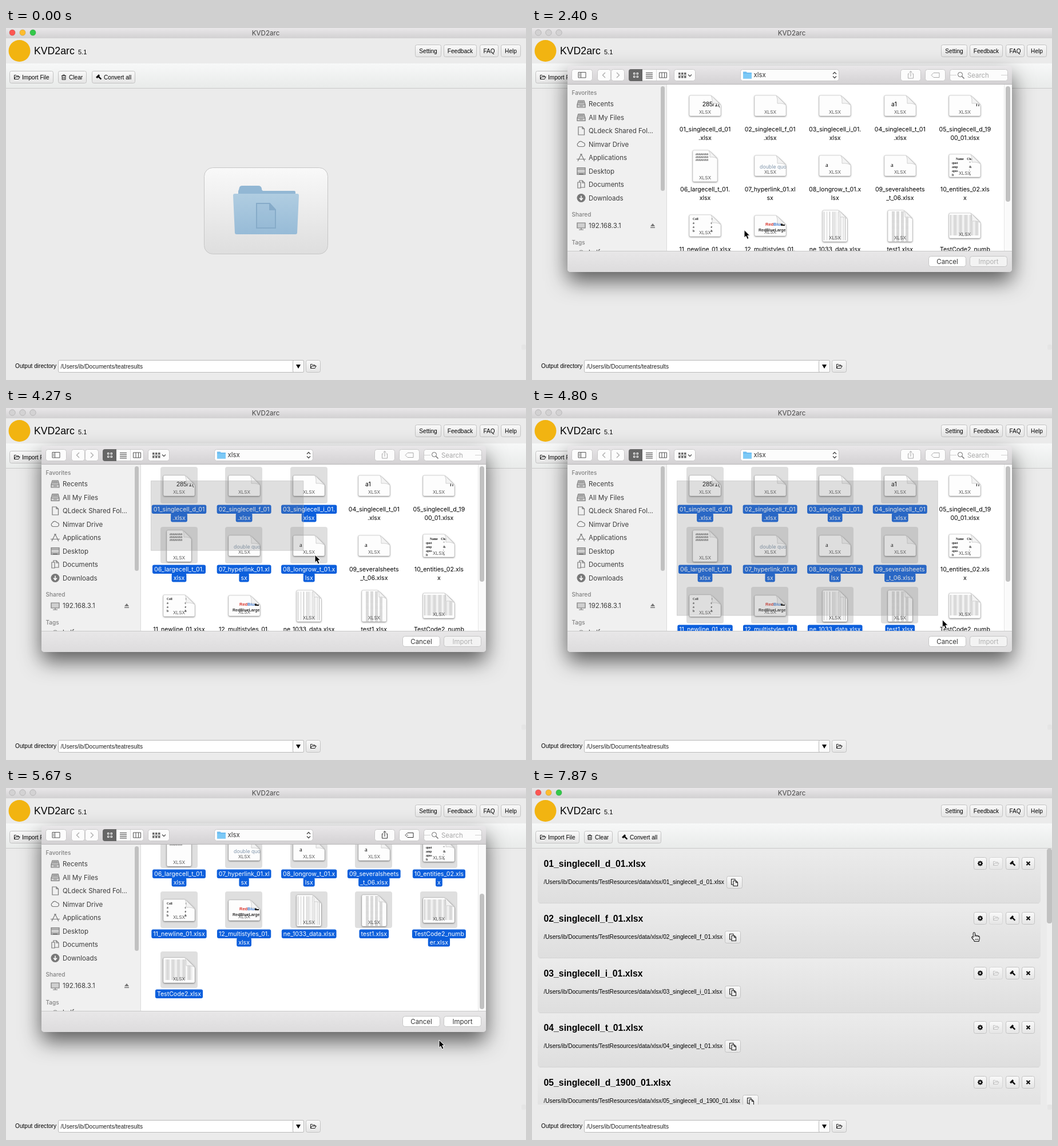
Recreate the animation shown at these times as an HTML page with a canvas. Size 909 by 616 pixels, loop 8000 ms.

```html
<!DOCTYPE html>
<html lang="en">
<head>
<meta charset="utf-8">
<title>KVD2arc</title>
<style>
html, body { margin: 0; width: 100%; height: 100%; overflow: hidden; background: #ebebeb; }
canvas { display: block; }
</style>
</head>
<body>
<canvas id="stage" width="909" height="616"></canvas>
<script>
const c = document.getElementById('stage').getContext('2d');
const HELV = '"Liberation Sans", sans-serif', UI = 'Inter, sans-serif', SERIF = '"Liberation Serif", serif';
const APP = 'KVD2arc', HOME = '/Users/ib/Documents/';

// ---- drawing helpers ----
function text(s, x, cy, size, color = '#000', align = 'left', family = HELV, weight = '') {
  c.font = `${weight} ${size}px ${family}`;
  c.fillStyle = color;
  c.textAlign = align;
  c.fillText(s, x, cy + size * .36);
}
const ui = (s, x, cy, size, color, align, weight) => text(s, x, cy, size, color, align, UI, weight);
function fade(y0, y1, a, b) {
  const g = c.createLinearGradient(0, y0, 0, y1);
  g.addColorStop(0, a);
  g.addColorStop(1, b);
  return g;
}
function box(x, y, w, h, r, fill, stroke) {
  const o = stroke ? .5 : 0;
  c.beginPath();
  c.roundRect(x + o, y + o, w - 2 * o, h - 2 * o, r);
  if (fill) { c.fillStyle = fill; c.fill(); }
  if (stroke) { c.strokeStyle = stroke; c.lineWidth = 1; c.stroke(); }
}
function rect(x, y, w, h, fill) { c.fillStyle = fill; c.fillRect(x, y, w, h); }
function disc(x, y, r, fill, stroke) {
  c.beginPath();
  c.arc(x, y, r, 0, 7);
  if (fill) { c.fillStyle = fill; c.fill(); }
  if (stroke) { c.strokeStyle = stroke; c.lineWidth = 1; c.stroke(); }
}
function shape(d, x, y, fill, stroke, width = 1) {
  const p = new Path2D(d);
  c.save();
  c.translate(x, y);
  c.lineWidth = width;
  if (fill) { c.fillStyle = fill; c.fill(p); }
  if (stroke) { c.strokeStyle = stroke; c.stroke(p); }
  c.restore();
}
function clipped(x, y, w, h, draw) {
  c.save();
  c.beginPath();
  c.rect(x, y, w, h);
  c.clip();
  draw();
  c.restore();
}

// ---- icons, centred on x, y ----
const folderIcon = (x, y, col = '#222') =>
  shape('M-4.5 3.5V-3.5H-1.5L-.5-2.2H3V-.5M-4.5 3.5L-2.5-.5H5.2L3 3.5Z', x, y, null, col);
function trashIcon(x, y) {
  shape('M-4-2.5H4M-1.5-2.5V-4H1.5V-2.5M-3-2.5V4.3H3V-2.5M-1.2-.5V3M1.2-.5V3', x, y, null, '#222');
}
const hammerIcon = (x, y) =>
  shape('M-5 0L0-5L2.2-2.8L1-1.4L5.2 2.8L3.6 4.6L-.8 .4L-2.6 2.2Z', x, y, '#111');
function gearIcon(x, y) {
  for (let i = 0; i < 4; i++) {
    c.save(); c.translate(x, y); c.rotate(i * Math.PI / 4);
    rect(-1, -4.5, 2, 9, '#111');
    c.restore();
  }
  disc(x, y, 3.4, '#111');
  disc(x, y, 1.4, '#f0f0f0');
}
const crossIcon = (x, y) => shape('M-3-3L3 3M3-3L-3 3', x, y, null, '#111', 2.2);
const copyIcon = (x, y) =>
  shape('M-2-3H3L5.5-.5V6H-2ZM2.5-3V0H5.5M-2 3.5H-5.5V-6H1V-3', x, y, null, '#222', 1.1);

// ---- main window ----
function button(x, y, w, h = 22, border = '#c2c2c2') { box(x, y, w, h, 3, fade(y, y + h, '#fafafa', '#e4e4e4'), border); }

function mainWindow(active, hover) {
  rect(0, 0, 909, 616, '#ebebeb');
  rect(0, 0, 909, 18, fade(0, 18, '#e9e7e9', '#d2d1d2'));
  ['#fc5753', '#fdbc2f', '#34c84a'].forEach((col, i) =>
    disc(11 + 18 * i, 8, 5.2, active ? col : '#d3d2d3', active ? 'rgba(0,0,0,.12)' : '#b9b8b9'));
  ui(APP, 454, 8.5, 11.6, '#454545', 'center');
  disc(23.5, 40, 19, '#f2b411');
  text(APP, 49, 40, 17.7);
  text('5.1', 126, 42, 11);
  for (const [label, x, w] of [['Setting', 715, 46], ['Feedback', 765, 58], ['FAQ', 828, 33], ['Help', 865, 35]]) {
    button(x, 29, w);
    text(label, x + w / 2, 40, 10.1, '#000', 'center');
  }
  rect(0, 62, 909, 43, fade(62, 105, '#f7f8f8', '#e9ebea'));
  rect(0, 105, 909, 1, '#c9c9c9');
  for (const [label, x, w, tx, icon] of [['Import File', 6, 77, 28, folderIcon], ['Clear', 91, 50, 110, trashIcon], ['Convert all', 150, 76, 171, hammerIcon]]) {
    button(x, 75, w);
    icon(tx - 9, 86);
    text(label, tx, 86, 10.1);
  }
  text('Output directory', 16, 591, 10.15);
  box(91, 581, 430, 22, 2, '#fff', '#b9b9b9');
  text(HOME + 'teatresults', 95.5, 592, 10.15, '#222');
  box(501, 581, 20, 22, 2, '#fafafa', '#b9b9b9');
  shape('M-4-3H4L0 4Z', 511, 592, '#000');
  button(524, 581, 26);
  folderIcon(537, 592);
  box(901, 554, 8, 9, 2, '#e5e5e5');
}

function dropZone(hover) {
  box(346, 244, 217, 152, 15, fade(244, 396, '#f9f9f9', '#dedede'), hover ? '#a9a9a9' : '#c6c6c6');
  shape('M406 292V285Q407 284 408 279Q409 276 413 276H441Q446 276 447 281Q447 285 450 285H504Q506 285 506 288V292Z', 0, 0, '#92b7d4');
  shape('M397 293Q397 290 400 290H509Q512 290 512 293L509 358Q509 361 506 361H403Q400 361 400 358Z', 0, 0, fade(290, 361, '#b0cde1', '#97bbd7'));
  shape('M438 307H461L471 318V350H438ZM461 307V318H471', 0, 0, 'rgba(120,165,200,.14)', '#86abc9', 2);
  shape('M461 307L471 318H461Z', 0, 0, '#86abc9');
}

function fileList() {
  clipped(0, 106, 909, 448, () => {
    ['01_singlecell_d_01', '02_singlecell_f_01', '03_singlecell_i_01', '04_singlecell_t_01', '05_singlecell_d_1900_01'].forEach((name, i) => {
      const y = Math.round(110 + i * 95.8);
      box(10, y, 879, 92, 5, fade(y, y + 92, '#ebebeb', '#dedede'));
      rect(13, y + 91, 873, 1, '#d3d3d3');
      text(name + '.xlsx', 20.5, y + 22, 15.8, '#000', 'left', HELV, 'bold');
      const path = HOME + `TestResources/data/xlsx/${name}.xlsx`;
      text(path, 20.5, y + 54, 10.1);
      const bx = Math.round(25 + c.measureText(path).width);
      button(bx, y + 44, 28);
      copyIcon(bx + 14, y + 55.5);
      [[772, 23, gearIcon], [799, 24], [828, 24, hammerIcon], [856, 23, crossIcon]].forEach(([x, w, icon]) => {
        button(x, y + 11, w, 22, icon ? '#c2c2c2' : '#d6d6d6');
        (icon || ((a, b) => folderIcon(a, b, '#c4c4c4')))(x + w / 2, y + 22);
      });
    });
    rect(900, 106, 9, 448, '#f0f0f0');
    box(900, 106, 9, 131, 4, '#c1c1c1');
  });
}

// ---- open panel ----
function hatch(x, y, w, h, step, seed) {
  for (let i = 0; i < w; i += step) {
    const k = Math.abs(Math.sin(i * 12.9 + seed)) * 90 | 0;
    rect(x + i, y, 1, h, `rgba(60,60,60,${(k + 10) / 260})`);
  }
}
const cells = (x, y, rows, cols, s) => {
  for (let r = 0; r < rows; r++) for (let k = 0; k < cols; k++) text(s[(r * cols + k) % s.length], x + k * 30, y + r * 7, 5.5, '#222', 'left', SERIF, 'bold');
};
// Each file: two label lines, page height, thumbnail painter relative to the page's left and centre.
const files = [
  ['01_singlecell_d_01', '.xlsx', 36, (x, y) => text('285/1(', x + 23, y - 3, 10.8)],
  ['02_singlecell_f_01', '.xlsx', 36],
  ['03_singlecell_i_01.', 'xlsx', 36],
  ['04_singlecell_t_01', '.xlsx', 36, (x, y) => ui('a1', x + 12, y - 3, 10.5)],
  ['05_singlecell_d_19', '00_01.xlsx', 36, (x, y) => text('h', x + 47, y - 3, 11)],
  ['06_largecell_t_01.', 'xlsx', 55, (x, y) => { for (let i = 0; i < 3; i++) text('########', x + 5, y - 20 + i * 5, 5, '#111'); }],
  ['07_hyperlink_01.xl', 'sx', 36, (x, y) => ui('double quot', x + 9, y + 2, 8.8, '#8196ab')],
  ['08_longrow_t_01.x', 'lsx', 36, (x, y) => text('a', x + 11, y - 2, 10.5, '#000', 'left', SERIF)],
  ['09_severalsheets', '_t_06.xlsx', 36, (x, y) => text('a', x + 11, y - 2, 10.5, '#000', 'left', SERIF)],
  ['10_entities_02.xls', 'x', 40, (x, y) => {
    text('Name    Cha', x + 12, y - 12, 5.5, '#111', 'left', SERIF, 'bold');
    cells(x + 5, y - 5, 4, 2, ['quot', '"', 'amp', '&', 'apos', "'", 'lt', '<']);
  }],
  ['11_newline_01.xlsx', '', 38, (x, y) => cells(x + 6, y - 12, 4, 2, ['Coll', '  C', 'a', ' c', 'a', ' e', 'b', ' h'])],
  ['12_multistyles_01.', 'xlsx', 36, (x, y) => {
    text('Red', x + 19, y - 3, 7.5, '#d8342c', 'left', HELV, 'bold');
    text('Blue', x + 33, y - 3, 7.5, '#3c76c8', 'left', HELV, 'bold');
    text('RedBlueLargeSr', x + 7, y + 7, 7, '#333', 'left', HELV, 'bold');
    rect(x + 46, y - 6, 3, 6, '#111');
    rect(x + 46, y - 2, 7, 2, '#111');
  }],
  ['ne_1033_data.xlsx', '', 55, (x, y) => { hatch(x + 2, y - 25, 16, 50, 5, 1); hatch(x + 18, y - 25, 22, 50, 3, 4); }],
  ['test1.xlsx', '', 55, (x, y) => {
    for (let r = 0; r < 24; r++) for (let k = 0; k < 4; k++) rect(x + 7 + k * 8, y - 25 + r * 2.2, 5, 1, '#b0b0b0');
  }],
  ['TestCode2_numb', 'er.xlsx', 44, (x, y) => hatch(x + 2, y - 19, 50, 36, 2, 2)],
  ['TestCode2.xlsx', '', 44, (x, y) => hatch(x + 2, y - 19, 50, 36, 2, 3)]
];

function page(x, y, w, h, paint) {
  const f = w > 50 ? 15 : 13;
  const d = `M0 2Q0 0 2 0H${w - f - 3}Q${w - f} 1 ${w - 3} ${f - 2}Q${w} ${f} ${w} ${f + 3}V${h - 2}Q${w} ${h} ${w - 2} ${h}H2Q0 ${h} 0 ${h - 2}Z`;
  c.save();
  c.shadowColor = 'rgba(0,0,0,.45)';
  c.shadowBlur = 3;
  c.shadowOffsetY = 1;
  shape(d, x, y, '#fdfdfd');
  c.restore();
  c.save();
  c.translate(x, y);
  c.clip(new Path2D(d));
  c.translate(-x, -y);
  if (paint) paint(x, y + h / 2);
  c.restore();
  shape(d, x, y, null, 'rgba(0,0,0,.13)');
  shape(`M${w - f - 2} 0Q${w - f + 1} 5 ${w - f} ${f - 1}Q${w - 5} ${f - 2} ${w} ${f + 2}Z`, x, y, '#f3f3f3', '#d0d0d0');
  ui('XLSX', x + w / 2, y + h - 6.5, 8.2, '#555', 'center');
}

function fileItem([line1, line2, h, paint], i, scroll, selected) {
  const cx = 302.5 + (i % 5) * 113.6, top = (i / 5 | 0) * 105 - scroll, w = h > 50 ? 43 : 55;
  if (selected) box(Math.round(cx) - 33, 103 + top, 65, 64, 4, '#dfdfdf');
  page(Math.round(cx - w / 2), Math.round(136 + top - h / 2), w, h, paint);
  [line1, line2].forEach((s, k) => {
    if (!s) return;
    const y = 177.5 + top + k * 14.5;
    c.font = '10.6px ' + UI;
    if (selected) {
      const tw = c.measureText(s).width + 6;
      box(cx - tw / 2, y - 8, tw, 15.5, 3, '#0c5fdc');
    }
    ui(s, cx, y, 10.6, selected ? '#fff' : '#000', 'center');
  });
}

const sideIcons = {
  tray: 'M-5-6H5L7 1V6H-7V1ZM-7 1H7M-4-4H4M-5-2H5M-3 3.5H3',
  page: 'M-5-7H2L5.5-3.5V7H-5ZM2-7V-3.5H5.5',
  cloud: 'M-4 4A3.5 3.5 0 0 1-5-2.5A4.5 4.5 0 0 1 3-3A3.6 3.6 0 0 1 4 4Z',
  apps: 'M-6 6L0-6L6 6M-8 2.5H8M-2-6H2',
  desk: 'M-7-6H7V6H-7ZM-7-3.5H7M-7 3.5H7M-4 5H4',
  docs: 'M-6-4H-1V6H-6ZM-3-4V-7H2L6-3V5H-1M2-7V-3H6',
  screen: 'M-7-6H7V3H-7ZM0 3V6M-4 6H4'
};
function sidebar() {
  rect(62, 99, 174, 291, '#f0f0f0');
  for (const [s, y] of [['Favorites', 113], ['Shared', 326], ['Tags', 375]]) ui(s, 69.5, y, 10, '#808080', 'left', 500);
  [['tray', 'Recents'], ['tray', 'All My Files'], ['page', 'QLdeck Shared Fol...'], ['cloud', 'Nimvar Drive'], ['apps', 'Applications'],
   ['desk', 'Desktop'], ['docs', 'Documents'], ['', 'Downloads']].forEach(([icon, s], i) => {
    const y = 133 + i * 23.5;
    if (icon) shape(sideIcons[icon], 86, y, icon === 'tray' || icon === 'desk' ? '#cfcfcf' : null, '#777', 1.2);
    ui(s, 99, y, 11.5, '#3c3c3c');
  });
  disc(86, 297.5, 7.5, '#777');
  shape('M0-4V3M-3 0L0 3.5L3 0', 86, 297.5, null, '#fff', 1.6);
  shape(sideIcons.screen, 86, 347, '#cfcfcf', '#777', 1.2);
  ui('192.168.3.1', 99, 346, 11.5, '#3c3c3c');
  shape('M-4 1L0-4L4 1ZM-4 2.5H4V4H-4Z', 211, 346, '#777');
  clipped(62, 380, 174, 10, () => { disc(86, 394, 5, '#fff', '#888'); ui('half', 99, 393, 11.5, '#3c3c3c'); });
  box(225, 102, 7, 183, 3.5, '#c1c1c1');
}

function toolbar(enabled) {
  c.beginPath();
  c.roundRect(62, 66, 777, 33, [5, 5, 0, 0]);
  c.fillStyle = fade(66, 99, '#e9e7e9', '#d3d1d3');
  c.fill();
  rect(62, 98, 777, 1, '#b8b7b8');
  for (const [x, w] of [[69, 37], [114, 24], [138, 24], [169, 72], [248, 38], [364, 173], [644, 36], [687, 36], [730, 102]])
    box(x, 72, w, 21, 4, '#fcfcfc', '#c9c8c9');
  box(169, 72, 24, 21, [4, 0, 0, 4], '#666');
  rect(217, 73, 1, 19, '#ddd');
  shape('M-6.5-4.5H6.5V5H-6.5ZM-2-4.5V5M-5-2H-3.5M-5 0H-3.5M-5 2H-3.5', 87.5, 82, null, '#555');
  shape('M2-4.5L-2.5 0L2 4.5', 126, 82.5, null, '#aaa', 1.3);
  shape('M-2-4.5L2.5 0L-2 4.5', 150, 82.5, null, '#aaa', 1.3);
  for (let i = 0; i < 4; i++) box(177 + (i % 2) * 5.5, 78 + (i >> 1) * 5.5, 3.5, 3.5, 0, null, '#fff');
  for (let i = 0; i < 4; i++) rect(199, 78 + i * 3, 12, 1.2, '#555');
  shape('M-6.5-4.5H6.5V4.5H-6.5ZM-2-4.5V4.5M2.5-4.5V4.5', 229, 82.5, null, '#555');
  for (let i = 0; i < 6; i++) rect(256 + (i % 3) * 5, 78 + (i / 3 | 0) * 6, 3.5, 3.5, '#666');
  rect(256, 82.5, 14, 1, '#888');
  shape('M-3-1.5L0 1.5L3-1.5', 276, 83, null, '#555', 1.3);
  shape('M-7.5-6H-2L-.5-4.5H7.5V6H-7.5Z', 376.5, 82.5, '#6cbcf0');
  rect(369, 80, 15, 8.5, '#7cc9f6');
  ui('xlsx', 387.5, 82, 11.4, '#333');
  shape('M-3-2L0-5L3-2M-3 2L0 5L3 2', 529, 82.5, null, '#444', 1.3);
  const tint = enabled ? '#333' : '#aaa';
  shape('M-2.5-2H-4.5V6H4.5V-2H2.5M0 3V-6.5M-2.5-4L0-6.5L2.5-4', 662, 82, null, tint);
  shape('M-7 0L-3-4H7V4H-3Z', 705, 82.5, null, tint);
  if (enabled) disc(702, 82.5, .8, tint);
  rect(731, 82, 11, 1, '#d0d0d0');
  rect(820, 82, 11, 1, '#d0d0d0');
  disc(748.5, 81.5, 4, null, '#666');
  shape('M3 3L7 7', 748.5, 81.5, null, '#666', 1.3);
  ui('Search', 761, 82.5, 11.4, '#a8a8a8');
}

function pushButton(label, x, fill, color) {
  box(x, 399, 66, 19, 4, fill, '#c6c6c6');
  ui(label, x + 33, 408.5, 11.4, color, 'center');
}

function openPanel(t) {
  const scroll = track(scrollKeys, t)[0], released = t >= 5670, dragging = t >= 3800 && !released;
  const [px, py] = track(moves, t - 25);
  const right = Math.max(px - (t > 5000 ? 1 : 3), 254), bottom = Math.max(Math.min(py, 390) - 1, 128);
  c.save();
  c.globalAlpha = track(panelFade, t)[0];
  c.save();
  c.shadowColor = 'rgba(0,0,0,.62)';
  c.shadowBlur = 36;
  c.shadowOffsetY = 16;
  box(62, 66, 777, 361, 5, '#e4e3e4');
  c.restore();
  toolbar(released);
  sidebar();
  rect(235, 99, 1, 291, '#dcdcdc');
  rect(236, 99, 603, 291, '#fff');
  clipped(236, 99, 590, 291, () => {
    files.forEach((f, i) => {
      const x = 275 + (i % 5) * 113.6, y = 118 + (i / 5 | 0) * 105;
      fileItem(f, i, scroll, released || dragging && right > x && bottom + scroll > y);
    });
    if (dragging) {
      box(253, 127 - scroll, right - 253, bottom - 126 + scroll, 0, 'rgba(128,128,128,.25)', 'rgba(180,180,180,.5)');
    }
  });
  rect(826, 99, 13, 291, '#fafafa');
  rect(825, 99, 1, 291, '#e6e6e6');
  box(828, 102 + scroll * 83 / 132, 8, 202, 4, '#c1c1c1');
  rect(62, 390, 777, 1, '#c8c8c8');
  box(62, 391, 777, 36, [0, 0, 5, 5], fade(391, 427, '#e8e7e8', '#dddcdd'));
  pushButton('Cancel', 693, '#fff', '#333');
  pushButton('Import', 765, t >= 6870 ? '#dedddf' : released ? '#fff' : '#f3f3f3', released ? '#333' : '#b0b0b0');
  c.restore();
}

// ---- motion ----
const moves = [[0, 893, 615], [330, 893, 615], [670, 520, 522], [930, 439, 450], [1400, 439, 448], [1800, 371, 354], [2930, 371, 353],
  [3300, 325, 250], [3730, 265, 132], [3800, 258, 130], [4000, 360, 180], [4270, 540, 257], [4600, 681, 315], [4870, 730, 390],
  [5130, 755, 415], [5330, 757, 441], [5670, 757, 441], [6070, 790, 413], [6330, 790, 413], [6400, 790, 411], [6670, 790, 411], [6730, 789, 409],
  [7200, 789, 409], [7400, 781, 405], [7730, 781, 405], [7800, 777, 310], [7870, 773, 252]];
const scrollKeys = [[4870, 0], [5130, 113], [5330, 132]];
const panelFade = [[2200, 0], [2400, 1]];

function track(keys, t) {
  const i = keys.findIndex(k => k[0] > t);
  if (i < 0) return keys[keys.length - 1].slice(1);
  if (!i) return keys[0].slice(1);
  const a = keys[i - 1], b = keys[i], f = (t - a[0]) / (b[0] - a[0]);
  return a.slice(1).map((v, k) => v + (b[k + 1] - v) * f);
}

function cursor(t) {
  if (t < 270 || t >= 330 && t < 670) return;
  const [x, y] = track(moves, t);
  const overZone = t < 2270 && y < 395, overList = t >= 7400;
  if (overZone || overList) {
    shape('M-1.7 9V2Q-1.5 .7-.2 .7Q1.2 .7 1.4 2V6Q3 5 4.3 6.5Q6 5.7 7 7.2Q9 6.8 9.3 9V12L8 16.5H.5Q-.5 13.5-3.5 11Q-5 9-3.5 8.4Q-2.5 8.2-1.7 9Z', x, y, '#fff', '#111', 1.1);
    shape('M1.4 6V9M4.3 6.5V9.2M7 7.2V9.4M2 11.5V14.5M4.2 11.5V14.5M6.4 11.5V14.5', x, y, null, '#111', .9);
  } else {
    shape('M0 0V13.5L3 10.7L5.3 16L8 14.9L5.7 9.7H9.8Z', x, y, '#000', '#fff', 1);
  }
}

function draw() {
  const step = Math.floor((performance.now() % 8000) * .015 + .07);
  const t = Math.round(step / .15) * 10;
  const modal = t >= 2200 && t < 7130;
  mainWindow(!modal);
  if (t < 7130) dropZone(t >= 1670 && !modal);
  else fileList();
  if (t >= 2270 && modal) openPanel(t);
  cursor(t);
  requestAnimationFrame(draw);
}
draw();
</script>
</body>
</html>
```
